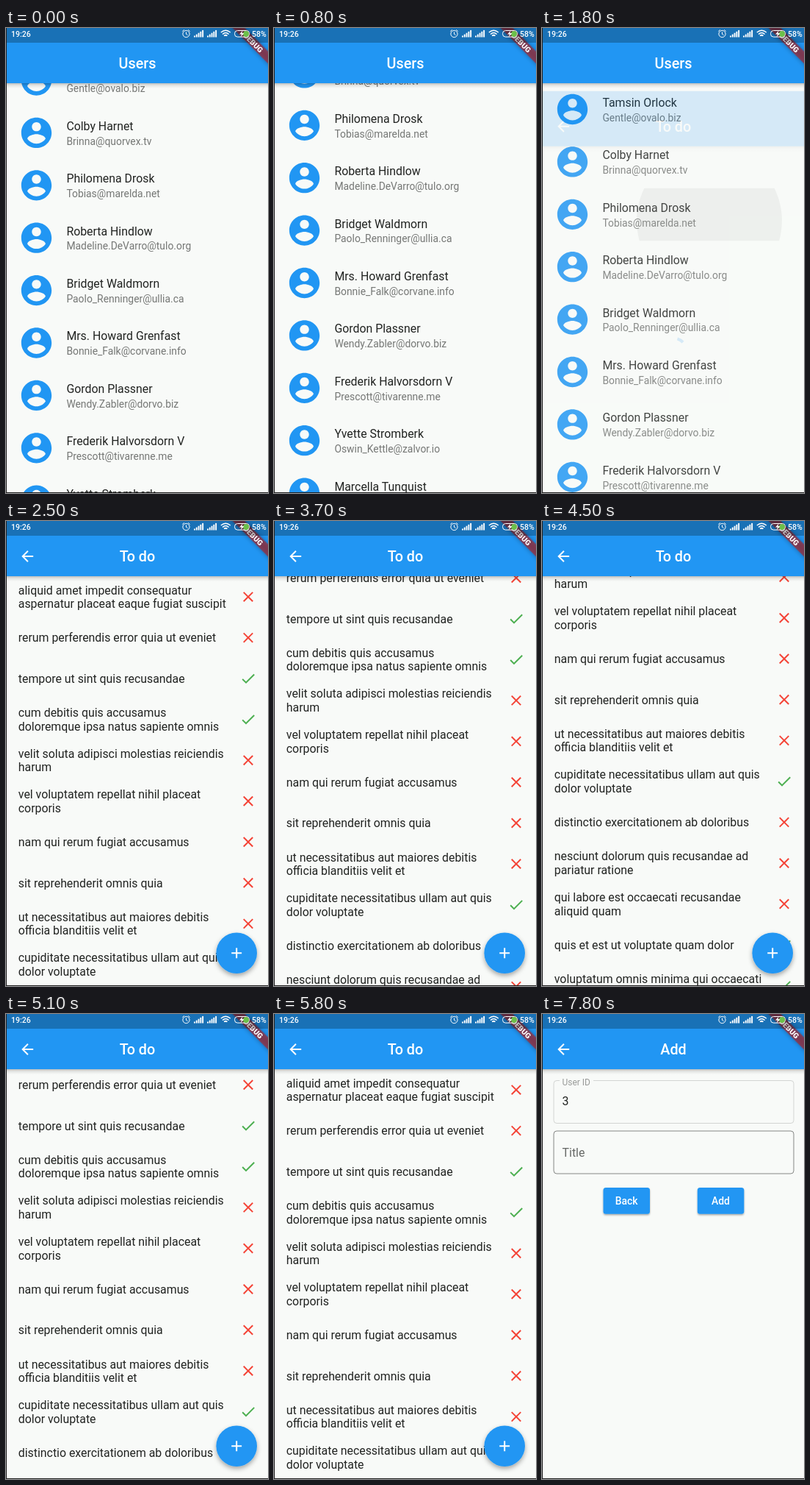
These frames come from a looping animation (357x632 px, 8000 ms). An HTML page:

```html
<!DOCTYPE html>
<html lang="en">
<head>
<meta charset="utf-8">
<title>Users and to-dos</title>
<style>
  html, body { margin: 0; width: 357px; height: 632px; overflow: hidden; background: #f8faf8; }
  svg { display: block; font-family: Roboto, sans-serif; }
  .bar { font-size: 19.8px; font-weight: 500; fill: #fff; text-anchor: middle; }
  .main { font-size: 15.87px; fill: #212321; }
  .sub { font-size: 13.88px; fill: #757775; }
  .status { font-size: 10.5px; font-weight: 500; fill: #fff; }
  .button { font-size: 13.9px; font-weight: 500; fill: #fff; text-anchor: middle; }
</style>
</head>
<body>
<svg id="stage" width="357" height="632" viewBox="0 0 357 632">
  <defs>
    <linearGradient id="shade" x2="0" y2="1">
      <stop offset="0" stop-color="#000" stop-opacity=".24"/>
      <stop offset=".4" stop-color="#000" stop-opacity=".09"/>
      <stop offset="1" stop-color="#000" stop-opacity="0"/>
    </linearGradient>
    <filter id="lift" x="-30%" y="-30%" width="160%" height="170%">
      <feDropShadow dx="0" dy="3" stdDeviation="3" flood-opacity=".35"/>
    </filter>
    <filter id="low" x="-20%" y="-20%" width="140%" height="160%">
      <feDropShadow dx="0" dy="1.5" stdDeviation="1.2" flood-opacity=".35"/>
    </filter>
    <clipPath id="tile"><rect x="0" y="217.8" width="357" height="71.4"/></clipPath>
  </defs>
</svg>
<script>
const LOOP = 8000, STEP = 100;
const SCALE = 357 / 360, TOP = 75, BLUE = '#2196f3', PAPER = '#f8faf8';
const USER_ROW = 72 * SCALE, TODO_ROW = 56 * SCALE;

const icons = {
  person: 'M12 2C6.48 2 2 6.48 2 12s4.48 10 10 10 10-4.48 10-10S17.52 2 12 2zm0 3c1.66 0 3 1.34 3 3s-1.34 3-3 3-3-1.34-3-3 1.34-3 3-3zm0 14.2c-2.5 0-4.71-1.28-6-3.22.03-1.99 4-3.08 6-3.08 1.99 0 5.97 1.09 6 3.08-1.29 1.94-3.5 3.22-6 3.22z',
  back: 'M20 11H7.83l5.59-5.59L12 4l-8 8 8 8 1.41-1.41L7.83 13H20z',
  check: 'M9 16.17L4.83 12l-1.42 1.41L9 19 21 7l-1.41-1.41z',
  cross: 'M19 6.41L17.59 5 12 10.59 6.41 5 5 6.41 10.59 12 5 17.59 6.41 19 12 13.41 17.59 19 19 17.59 13.41 12z',
  plus: 'M19 13h-6v6h-2v-6H5v-2h6V5h2v6h6z'
};

const users = [
  ['Tamsin Orlock', 'Gentle@ovalo.biz'],
  ['Colby Harnet', 'Brinna@quorvex.tv'],
  ['Philomena Drosk', 'Tobias@marelda.net'],
  ['Roberta Hindlow', 'Madeline.DeVarro@tulo.org'],
  ['Bridget Waldmorn', 'Paolo_Renninger@ullia.ca'],
  ['Mrs. Howard Grenfast', 'Bonnie_Falk@corvane.info'],
  ['Gordon Plassner', 'Wendy.Zabler@dorvo.biz'],
  ['Frederik Halvorsdorn V', 'Prescott@tivarenne.me'],
  ['Yvette Stromberk', 'Oswin_Kettle@zalvor.io'],
  ['Marcella Tunquist', 'Rowan.Pell@brindavo.biz']
];

// A leading + marks a finished item, | breaks the line.
const todos = [
  'aliquid amet impedit consequatur|aspernatur placeat eaque fugiat suscipit',
  'rerum perferendis error quia ut eveniet',
  '+tempore ut sint quis recusandae',
  '+cum debitis quis accusamus|doloremque ipsa natus sapiente omnis',
  'velit soluta adipisci molestias reiciendis|harum',
  'vel voluptatem repellat nihil placeat|corporis',
  'nam qui rerum fugiat accusamus',
  'sit reprehenderit omnis quia',
  'ut necessitatibus aut maiores debitis|officia blanditiis velit et',
  '+cupiditate necessitatibus ullam aut quis|dolor voluptate',
  'distinctio exercitationem ab doloribus',
  'nesciunt dolorum quis recusandae ad|pariatur ratione',
  'qui labore est occaecati recusandae|aliquid quam',
  '+quis et est ut voluptate quam dolor',
  '+voluptatum omnis minima qui occaecati|provident nulla voluptatem ratione',
  'deleniti ea temporibus enim'
];

// [time, value] tables
const userScroll = [[0, 39.5], [100, 75], [200, 108], [300, 134], [400, 150], [500, 157], [600, 157],
  [700, 146], [800, 121], [900, 92], [1000, 64], [1100, 42], [1200, 25], [1300, 12], [1400, 4], [1500, 0]];
const todoScroll = [[3600, 0], [3700, 81.3], [3800, 81.3], [3900, 126], [4000, 178], [4100, 216], [4200, 236],
  [4400, 236], [4500, 249], [4600, 256], [4700, 256], [4800, 222], [4900, 166], [5000, 110], [5100, 62.3],
  [5200, 30], [5300, 12], [5400, 3], [5500, 0]];
const glowAlpha = [[5200, 0], [5300, .06], [5400, .1], [5500, .07], [5700, .07], [5800, 0]];
const tapRadius = [[1500, 0], [1600, 34], [1700, 66], [1800, 99], [2000, 165]];
const fabRadius = [[6100, 0], [6200, 15], [6300, 15], [6400, 27.8]];
const fabAlpha = [[6100, 0], [6200, .2], [6500, .2], [6600, .1], [6700, 0]];

function at(table, t) {
  const i = table.findIndex(p => p[0] > t);
  if (i === 0) return table[0][1];
  if (i < 0) return table[table.length - 1][1];
  const [t0, a] = table[i - 1], [t1, b] = table[i];
  return a + (b - a) * (t - t0) / (t1 - t0);
}

function bezier(x1, y1, x2, y2) {
  const mix = (a, b, s) => 3 * a * s * (1 - s) ** 2 + 3 * b * s * s * (1 - s) + s ** 3;
  return x => {
    let lo = 0, hi = 1;
    for (let i = 0; i < 24; i++) {
      const mid = (lo + hi) / 2;
      if (mix(x1, x2, mid) < x) lo = mid; else hi = mid;
    }
    return mix(y1, y2, lo);
  };
}
const slideEase = bezier(.4, 0, .2, 1), fadeEase = bezier(.42, 0, 1, 1);

function set(el, attrs) {
  for (const key in attrs) el.setAttribute(key, attrs[key]);
}
function add(parent, tag, attrs = {}, content) {
  const el = document.createElementNS('http://www.w3.org/2000/svg', tag);
  set(el, attrs);
  if (content !== undefined) el.textContent = content;
  parent.appendChild(el);
  return el;
}
const box = (g, x, y, width, height, fill, more) => add(g, 'rect', { x, y, width, height, fill, ...more });
const disc = (g, cx, cy, r, fill, more) => add(g, 'circle', { cx, cy, r, fill, ...more });
const line = (g, d, stroke, width) => add(g, 'path', { d, stroke, fill: 'none', 'stroke-width': width });
const label = (g, x, y, cls, text) => add(g, 'text', { x, y, class: cls }, text);
function icon(g, name, cx, cy, fill, size = 24) {
  const k = size * SCALE / 24;
  return add(g, 'path', { d: icons[name], fill, transform: `translate(${cx} ${cy}) scale(${k}) translate(-12 -12)` });
}

const stage = document.getElementById('stage');

function makePage(title, hasBack) {
  const root = add(stage, 'g');
  box(root, 0, 0, 357, 632, PAPER);
  const body = add(root, 'g');
  box(root, 0, TOP, 357, 7, 'url(#shade)');
  box(root, 0, 0, 357, TOP, BLUE);
  label(root, 179, 55.4, 'bar', title);
  if (hasBack) icon(root, 'back', 29.2, 48, '#fff');
  return { root, body };
}

const userPage = makePage('Users', false);
const tap = disc(add(userPage.body, 'g', { 'clip-path': 'url(#tile)' }), 228, 262, 0, '#000', { 'fill-opacity': .05 });
const userList = add(userPage.body, 'g');
users.forEach(([name, mail], i) => {
  const y = TOP + USER_ROW * (i + .5);
  icon(userList, 'person', 41.5, y - .2, BLUE, 50);
  label(userList, 82.4, y - 3.8, 'main', name);
  label(userList, 82.4, y + 16, 'sub', mail);
});

const todoPage = makePage('To do', true);
const todoList = add(todoPage.body, 'g');
todos.forEach((item, i) => {
  const done = item[0] === '+', y = TOP + TODO_ROW * (i + .5);
  const lines = item.slice(done ? 1 : 0).split('|');
  lines.forEach((text, n) => label(todoList, 16.8, y + 6.1 + 18.6 * (n - (lines.length - 1) / 2), 'main', text));
  icon(todoList, done ? 'check' : 'cross', 330, y + .3, done ? '#4caf50' : '#f44336');
});
const glow = add(todoPage.body, 'path', { d: `M1 ${TOP}H357Q179 ${TOP + 72} 1 ${TOP}z`, fill: BLUE });
const spinner = add(todoPage.body, 'path', { fill: 'none', stroke: BLUE, 'stroke-width': 4 });
const fab = add(todoPage.root, 'g', { transform: 'translate(314.2 587.2)' });
disc(fab, 0, 0, 27.8, BLUE, { filter: 'url(#lift)' });
const fabSplash = disc(fab, 0, 0, 0, '#fff');
icon(fab, 'plus', 0, 0, '#fff');

const addPage = makePage('Add', true);
function field(y, stroke) {
  box(addPage.body, 16, y, 327, 58, 'none', { rx: 4, stroke });
}
field(90.5, '#d3d5d3');
box(addPage.body, 24, 88, 46, 5, PAPER);
label(addPage.body, 27.6, 97, 'sub', 'User ID').style.cssText = 'font-size:11.9px;fill:#989a98';
label(addPage.body, 27.6, 124.2, 'main', '3');
field(159, '#858785');
label(addPage.body, 27.6, 193.6, 'main', 'Title').style.fill = '#666866';
[['Back', 83.5], ['Add', 211.8]].forEach(([text, x]) => {
  box(addPage.body, x, 236, 63.5, 35.7, BLUE, { rx: 3.5, filter: 'url(#low)' });
  label(addPage.body, x + 31.7, 258.8, 'button', text);
});

function drawOverlay() {
  const ribbon = add(stage, 'g', { transform: `translate(357 0) rotate(45) scale(${SCALE})` });
  box(ribbon, -60, 22.5, 120, 12, '#b71c1c', { 'fill-opacity': .63, style: 'filter:drop-shadow(0 0 3px rgba(0,0,0,.5))' });
  add(ribbon, 'text', { y: 32.2, fill: '#fff', 'font-size': 10.2, 'font-weight': 900, 'text-anchor': 'middle' }, 'DEBUG');

  box(stage, 0, 0, 357, 20, '#000', { 'fill-opacity': .25 });
  label(stage, 7, 12, 'status', '19:26');
  label(stage, 335, 12, 'status', '58%');
  disc(stage, 245.5, 8, 4.6, 'none', { stroke: '#fff' });
  line(stage, 'M245.5 5.5V8.3L247.5 9.6M240.3 4.6L242.8 2.4M250.7 4.6L248.2 2.4', '#fff', 1);
  for (const x of [256, 274])
    for (let i = 0; i < 5; i++) box(stage, x + i * 2.8, 10.5 - i * 1.9, 1.9, 2 + i * 1.9, '#fff');
  line(stage, 'M292.8 6Q299.3 .4 305.8 6M295 8.4Q299.3 4.6 303.6 8.4', '#fff', 1.4);
  line(stage, 'M297.2 10.7Q299.3 8.8 301.4 10.7', '#fff', 1.8);
  box(stage, 311.5, 3.5, 20, 8.6, 'none', { rx: 4, stroke: '#fff' });
  disc(stage, 327, 8, 4, '#6cc04a');
  add(stage, 'path', { d: 'M322.5 3.5L318 8.5H321L319.5 12.5L324.5 7H321.5z', fill: '#fff' });

  box(stage, 0, 0, 1, 632, '#222');
  box(stage, 0, 631, 357, 1, '#222');
}
drawOverlay();

function arc(from, sweep) {
  const point = deg => {
    const a = deg * Math.PI / 180;
    return `${179 + 17.8 * Math.sin(a)} ${353.5 - 17.8 * Math.cos(a)}`;
  };
  return `M${point(from)}A17.8 17.8 0 ${sweep > 180 ? 1 : 0} 1 ${point(from + sweep)}`;
}

const show = (el, on) => { el.style.display = on ? '' : 'none'; };

function render(time) {
  const t = Math.floor(time / STEP) * STEP;
  userList.setAttribute('transform', `translate(0 ${-at(userScroll, t)})`);
  tap.setAttribute('r', at(tapRadius, t));

  // The new page rises a quarter of the height while it fades in.
  const p = Math.min(1, Math.max(0, (t - 1700) / 300));
  show(todoPage.root, p > 0 && t < 7200);
  set(todoPage.root, { opacity: fadeEase(p), transform: `translate(0 ${158 * (1 - slideEase(p))})` });

  const loaded = t >= 2400;
  show(todoList, loaded);
  show(spinner, !loaded);
  const spin = Math.max(0, t - 1700);
  spinner.setAttribute('d', arc(spin * .18, Math.min(250, spin * .29)));
  todoList.setAttribute('transform', `translate(0 ${-at(todoScroll, t)})`);
  glow.setAttribute('opacity', at(glowAlpha, t));
  set(fabSplash, { r: at(fabRadius, t), opacity: at(fabAlpha, t) });

  show(addPage.root, t >= 7200);
}

const start = performance.now();
function tick() {
  render((performance.now() - start) % LOOP);
  requestAnimationFrame(tick);
}
tick();
</script>
</body>
</html>
```
